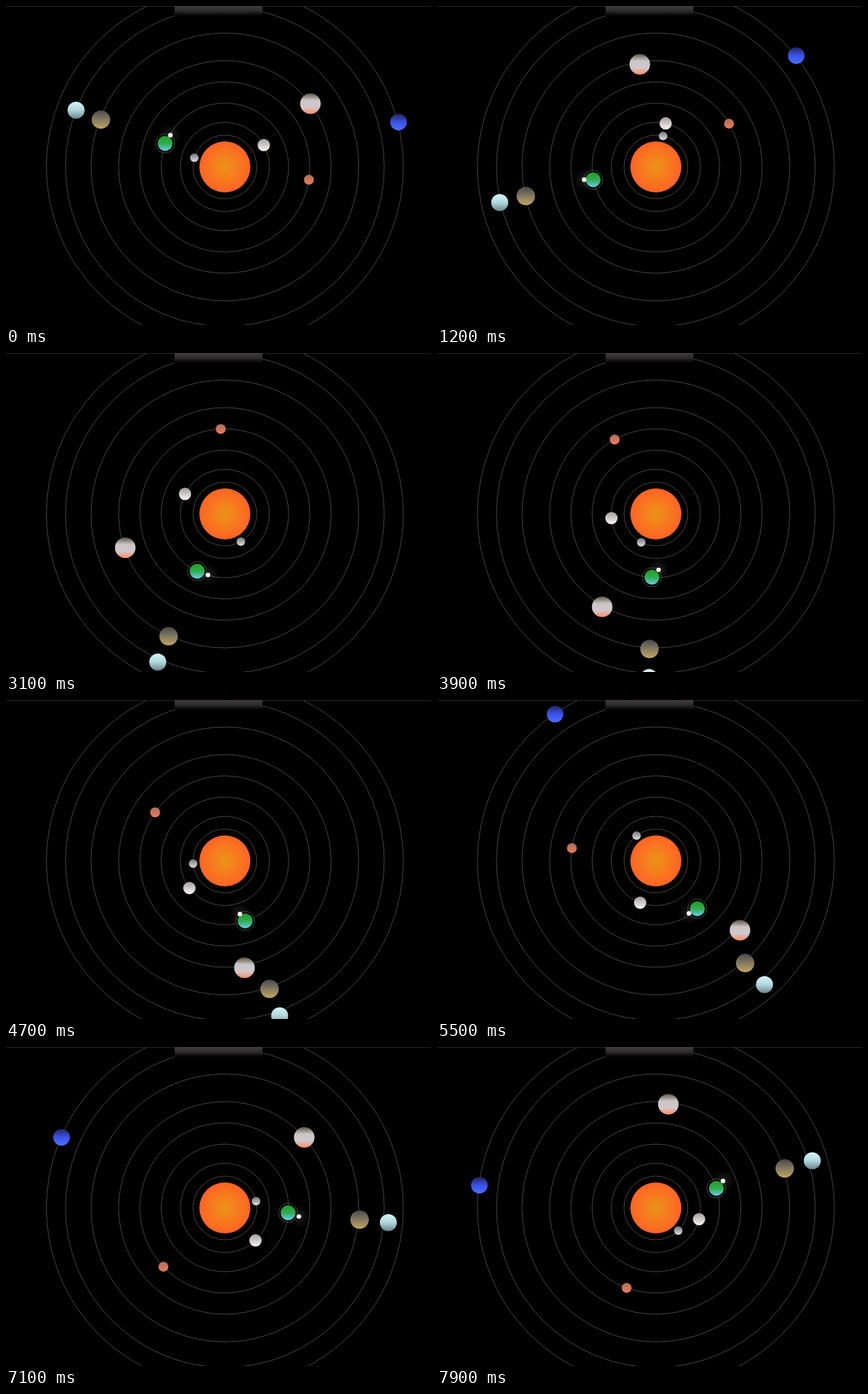
An HTML page with a canvas that plays this animation: 600x450 px, repeating every 8000 ms.

```html
<!DOCTYPE html>
<html>
<head>
<meta charset="utf-8">
<style>
html, body { margin: 0; width: 100%; height: 100%; overflow: hidden; background: #000; }
canvas { display: block; }
</style>
</head>
<body>
<canvas id="stage" width="600" height="450"></canvas>
<script>
const ctx = document.getElementById('stage').getContext('2d');
const LOOP = 8000, CX = 309, CY = 227;
const RINGS = [45, 63, 90, 120, 150, 189, 225, 252];

// orbit: radius, centre offset dx/dy, start angle (deg), signed period (s); size: disc radius
const planets = [
  { orbit: 45, dx: 0, dy: 0, start: 196.6, period: 5, size: 6, colors: ['#77777c', '#dedee0'] },
  { orbit: 63, dx: 0, dy: 0, start: -29.3, period: -9, size: 8.7, colors: ['#a49c9c', '#fbf6f6'] },
  { orbit: 90, dx: -.5, dy: -.5, start: 201.3, period: -13, size: 10.5, colors: ['#1f9f1f', '#2fac50', '#66cdea'], moon: true },
  { orbit: 120, dx: 0, dy: 0, start: 8.7, period: -11, size: 7, colors: ['#a9705a', '#f4775a'] },
  { orbit: 150, dx: 2.5, dy: 3, start: -37.9, period: -7, size: 14.5, colors: ['#5c553f', '#cbc5c6', '#d0c8cc', '#ff8c60'] },
  { orbit: 189.3, dx: 1.5, dy: 1.5, start: 201.2, period: -13, size: 13, colors: ['#48484f', '#857a5e', '#c2a660'] },
  { orbit: 228.5, dx: 3, dy: 2.5, start: 201.2, period: -13, size: 12, colors: ['#d2f7f7', '#b2d6da', '#66868c'] },
  { orbit: 252.3, dx: 1, dy: .5, start: -14.6, period: -18, size: 11.7, colors: ['#26245f', '#3a52ea', '#4a70ff'] }
];
const moon = { orbit: 14.35, dx: 1.5, dy: 1.5, start: -65.5, period: -4 };

function place(body, x, y, t) {
  const a = (body.start + 360 * t / body.period) * Math.PI / 180;
  return [x + body.dx + body.orbit * Math.cos(a), y + body.dy + body.orbit * Math.sin(a)];
}

function blend(gradient, colors) {
  colors.forEach((c, i) => gradient.addColorStop(i / (colors.length - 1), c));
  return gradient;
}

function disc(x, y, r, fill) {
  ctx.beginPath();
  ctx.arc(x, y, r, 0, 2 * Math.PI);
  ctx.fillStyle = fill;
  ctx.fill();
}

function ring(x, y, r) {
  ctx.beginPath();
  ctx.arc(x, y, r, 0, 2 * Math.PI);
  ctx.strokeStyle = '#444';
  ctx.lineWidth = 1;
  ctx.stroke();
}

function drawTopGlow() {
  ctx.fillStyle = '#242424';
  ctx.fillRect(0, 0, 600, 1);
  ctx.fillStyle = blend(ctx.createLinearGradient(0, 0, 0, 14), ['#403d3d', '#2c2a2a', '#000']);
  ctx.fillRect(238, 0, 124, 14);
}

function drawMoon(x, y, t) {
  const [mx, my] = place(moon, x, y, t);
  const glow = ctx.createRadialGradient(mx, my, 0, mx, my, 16);
  disc(mx, my, 16, blend(glow, ['rgba(255,235,255,.12)', 'rgba(255,235,255,0)']));
  ring(x, y, 13.5);
  return () => disc(mx, my, 3.2, '#fcf8f8');
}

function draw(t) {
  ctx.fillStyle = '#000';
  ctx.fillRect(0, 0, 600, 450);
  RINGS.forEach(r => ring(CX, CY, r));
  drawTopGlow();
  const sun = ctx.createRadialGradient(CX, CY, 0, CX, CY, 36);
  disc(CX, CY, 36, blend(sun, ['#ea9417', '#f57c1e', '#ff6325']));
  for (const p of planets) {
    const [x, y] = place(p, CX, CY, t);
    const finishMoon = p.moon && drawMoon(x, y, t);
    disc(x, y, p.size, blend(ctx.createLinearGradient(0, y - p.size, 0, y + p.size), p.colors));
    if (finishMoon) finishMoon();
  }
}

function tick() {
  draw(performance.now() % LOOP / 1000);
  requestAnimationFrame(tick);
}
tick();
</script>
</body>
</html>
```
